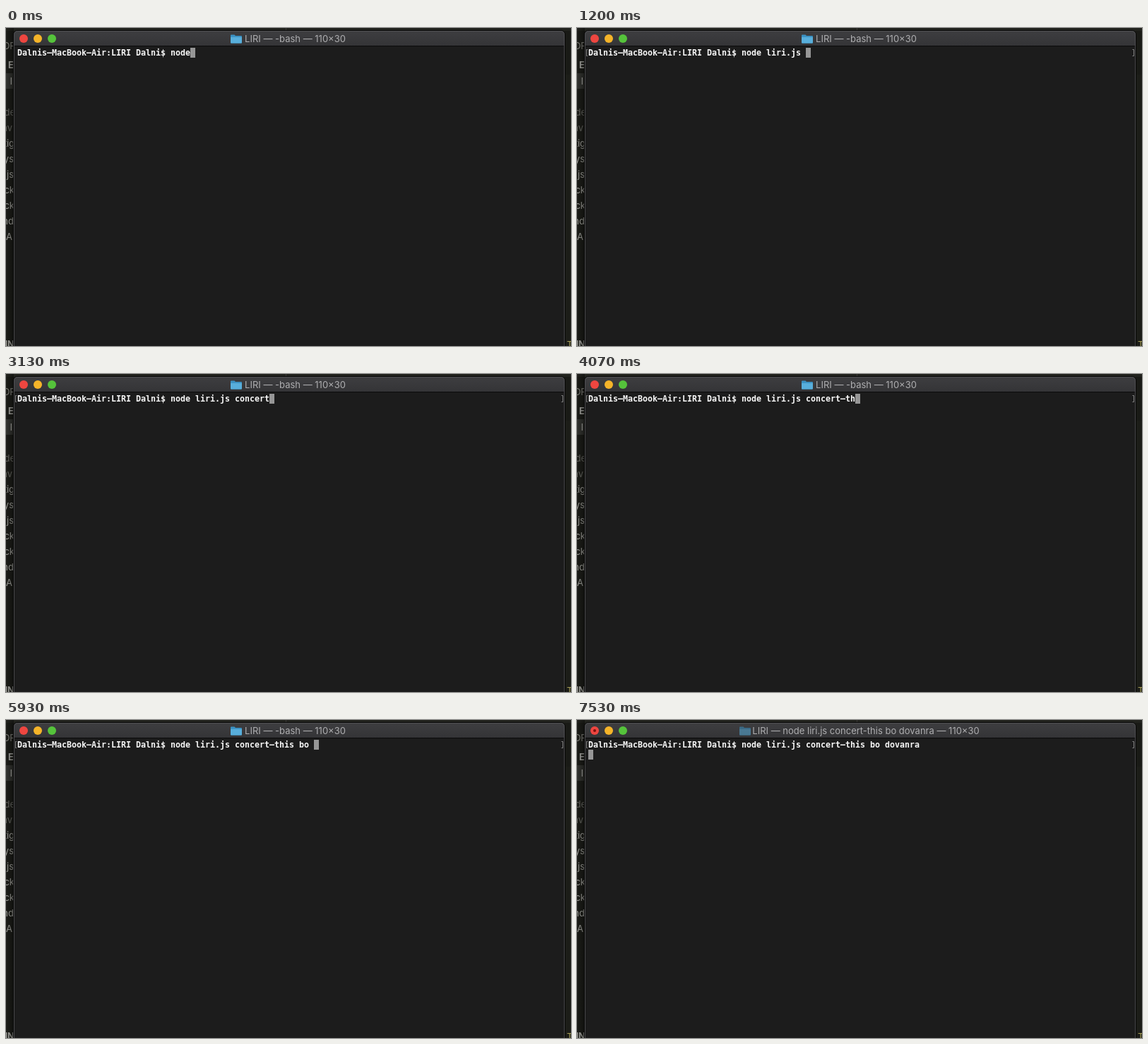
Write an HTML page that moves like this. It is 800 px wide and 450 px high and loops after 8 s.

```html
<!DOCTYPE html>
<html lang="en">
<head>
<meta charset="utf-8">
<title>Terminal session</title>
<style>
  html, body { margin: 0; width: 100%; height: 100%; overflow: hidden; background: #1c1d18; }
  svg { display: block; width: 100vw; height: 100vh; }
  text { white-space: pre; }
  .ui { font-family: Inter, "Open Sans", sans-serif; font-size: 13px; }
  .mono { font-family: "DejaVu Sans Mono", "Noto Sans Mono", monospace; font-size: 11.63px; font-weight: 700; fill: #f7f7f7; }
</style>
</head>
<body>
<svg viewBox="0 0 800 450" xmlns="http://www.w3.org/2000/svg">
  <defs>
    <linearGradient id="bar" x1="0" y1="0" x2="0" y2="1">
      <stop offset="0" stop-color="#3e3e40"/>
      <stop offset="1" stop-color="#343437"/>
    </linearGradient>
    <linearGradient id="shade" x1="0" y1="0" x2="1" y2="0">
      <stop offset="0" stop-color="#000" stop-opacity="0"/>
      <stop offset="1" stop-color="#000" stop-opacity=".4"/>
    </linearGradient>
  </defs>

  <!-- Editor behind the terminal -->
  <rect width="800" height="450" fill="#1c1d18"/>
  <rect width="800" height="4" fill="#22231e"/>
  <rect x="396" width="1" height="3" fill="#3a3a36"/>
  <rect y="64" width="12" height="22" fill="#333430"/>
  <rect x="791" y="4" width="9" height="62" fill="#191a16"/>
  <g id="sidebar" class="ui" text-anchor="end"></g>
  <text class="ui" x="794" y="453" font-size="11" fill="#a39b56">T</text>
  <rect width="11" height="450" fill="url(#shade)"/>

  <!-- Terminal window -->
  <path d="M10.5 451V9a5.5 5.5 0 0 1 5.500-5.500H786a5.500 5.500 0 0 1 5.500 5.500V451Z" fill="#1c1c1c" stroke="#070707"/>
  <path d="M11 25V9a5 5 0 0 1 5-5H786a5 5 0 0 1 5 5V25Z" fill="url(#bar)"/>
  <path d="M11.500 450V9.500a5 5 0 0 1 5-5H785.500a5 5 0 0 1 5 5V450" fill="none" stroke="#59595b" stroke-opacity=".75"/>
  <rect x="12" y="25" width="778" height="1" fill="#0b0b0b"/>
  <circle cx="25" cy="15" r="6" fill="#ee4640"/>
  <circle id="busy" cx="25" cy="15" r="2" fill="#7d100d"/>
  <circle cx="45" cy="15" r="6" fill="#f5b429"/>
  <circle cx="65" cy="15" r="6" fill="#55c33b"/>

  <g id="folder">
    <path d="M0 1.500Q0 .5 1 .5H5.500L7 2H15Q16 2 16 3V11.500Q16 12.500 15 12.500H1Q0 12.500 0 11.500Z" fill="#3b91c2"/>
    <path d="M0 4H16V11.500Q16 12.500 15 12.500H1Q0 12.500 0 11.500Z" fill="#58aedb"/>
  </g>
  <text id="title" class="ui" y="20" text-anchor="middle" fill="#aeaeb0"></text>

  <g id="marks" fill="none" stroke="#858585">
    <path d="M15 30.500H13.500V39.500H15M786.500 30.500H788.500V39.500H786.500"/>
  </g>
  <rect id="cursor" width="7" height="14" fill="#969696"/>
  <text id="line" class="mono" x="16" y="39"></text>
</svg>

<script>
  const LOOP = 8000, CELL = 7, LEFT = 16, TOP = 28, ROW = 14;
  const ENTER = 7330, RUN = 7470, TAB = 1200;
  const PROMPT = "Dalnis-MacBook-Air:LIRI Dalni$ ";
  const COMMAND = "node liri.js concert-this bo dovanra";

  // [time, number of command characters visible]
  const KEYS = [
    [0, 4], [70, 5], [400, 6], [600, 7], [870, 8], [TAB, 13],
    [2270, 14], [2330, 15], [2470, 16], [2600, 17], [2800, 18], [2930, 19], [3070, 20],
    [3400, 21], [3670, 22], [4000, 23], [4200, 24], [4330, 25], [4930, 26],
    [5600, 27], [5800, 28], [5930, 29], [6130, 30], [6270, 31], [6400, 32],
    [6600, 33], [6800, 34], [6930, 35], [7070, 36]
  ];

  // [label, baseline, colour, weight, right edge]
  const SIDEBAR = [
    ["OF", 30, "#85857f", 400, 13], ["I E", 57, "#a4a49f", 700, 11],
    ["l", 80, "#b5b5b0", 400, 9], ["de", 124, "#666661", 400, 13],
    ["nv", 146, "#666661", 400, 9], ["tig", 168, "#a0a09b", 400, 12],
    ["ys", 190, "#a0a09b", 400, 11], [".js", 212, "#a0a09b", 400, 11],
    ["ck", 234, "#a0a09b", 400, 12], ["ck", 256, "#a0a09b", 400, 12],
    ["nd", 278, "#a0a09b", 400, 11], ["A", 300, "#a0a09b", 400, 9],
    ["IN", 452, "#a4a49f", 700, 12]
  ];

  const el = id => document.getElementById(id);
  const set = (node, attrs) => {
    for (const name in attrs) node.setAttribute(name, attrs[name]);
  };
  const setText = (node, value) => {
    if (node.textContent !== value) node.textContent = value;
  };
  const show = (node, on) => set(node, { visibility: on ? "visible" : "hidden" });

  for (const [label, y, fill, weight, x] of SIDEBAR) {
    const text = document.createElementNS("http://www.w3.org/2000/svg", "text");
    set(text, { x, y, fill, "font-weight": weight });
    text.textContent = label;
    el("sidebar").append(text);
  }

  const typedAt = t => KEYS.filter(([time]) => time <= t).pop()[1];

  function draw(t) {
    const entered = t >= ENTER, running = t >= RUN;
    const line = PROMPT + COMMAND.slice(0, typedAt(t));
    // Wide dashes stand for the terminal face's long hyphens.
    setText(el("line"), line.replace(/-/g, "–"));
    set(el("cursor"), {
      x: LEFT + (entered ? 0 : line.length * CELL),
      y: TOP + (entered ? ROW : 0)
    });
    show(el("marks"), t >= TAB);
    show(el("busy"), running);

    const task = running ? COMMAND : "-bash";
    setText(el("title"), `LIRI — ${task} — 110×30`);
    set(el("title"), { x: running ? 409 : 409.5 });
    set(el("folder"), {
      transform: `translate(${running ? 230 : 318} 9)`,
      opacity: running ? 0.55 : 1
    });
  }

  const start = performance.now();
  function tick() {
    draw((performance.now() - start) % LOOP);
    requestAnimationFrame(tick);
  }
  draw(0);
  requestAnimationFrame(tick);
</script>
</body>
</html>
```
